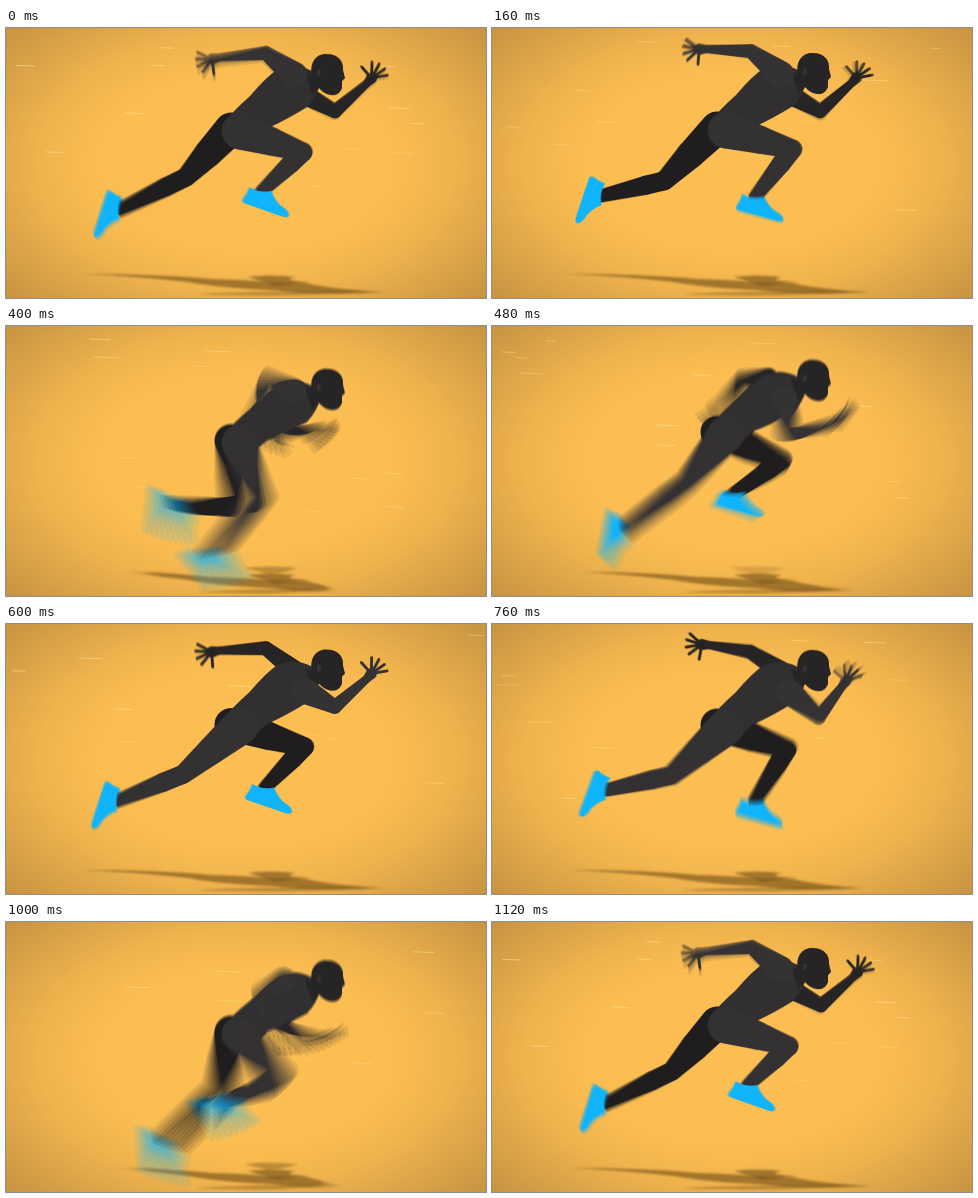
These frames come from a looping animation (480 by 270 pixels, 1.16 s). An HTML page with a canvas:

```html
<!DOCTYPE html>
<html lang="en">
<head>
<meta charset="utf-8">
<title>Sprinter</title>
<style>
  html, body { margin: 0; width: 100%; height: 100%; overflow: hidden; background: #e4aa4a; }
  canvas { display: block; width: 480px; height: 270px; }
</style>
</head>
<body>
<canvas id="stage" width="480" height="270"></canvas>
<script>
const W = 480, H = 270, STEP = 40, STEPS = 29, STRIDE = 28, SAMPLES = 10, SHUTTER = 0.85;
const TAU = Math.PI * 2, RAD = Math.PI / 180;
const COLOR = {
  torso: '#312f30', nearLeg: '#343132', nearArm: '#353233',
  farLeg: '#1f1d1e', farArm: '#262425', head: '#262425', shoe: '#10b4fc'
};

// time, knee x y, ankle x y, shoe angle
const LEG = [
  [0, 297, 124, 256, 163, 18], [4, 301, 121, 263, 169, 14], [5, 295, 125, 262, 178, 14],
  [8, 288, 156, 264, 214, 14], [9, 276, 163, 243, 218, 16], [12, 194, 156, 131, 205, 97],
  [14, 180, 149, 113, 182, 106], [18, 172, 153, 109, 168, 107], [19, 180, 151, 114, 166, 109],
  [22, 195, 172, 128, 167, 104], [23, 204, 178, 139, 167, 104], [26, 290, 135, 242, 167, 14]
];
// time, elbow x y, wrist x y, hand angle, finger spread
const ARM = [
  [0, 260, 25, 213, 30, 166, 1], [4, 259, 23, 214, 21, 178, 1], [5, 258, 28, 217, 21, 185, 1],
  [8, 263, 31, 222, 32, 140, .7], [9, 267, 40, 232, 60, 130, .6], [12, 297, 109, 338, 99, -28, .35],
  [14, 329, 83, 361, 55, -48, 1], [18, 328, 83, 360, 55, -48, 1], [19, 327, 93, 350, 62, -55, 1],
  [22, 320, 105, 350, 82, -46, .8], [23, 294, 119, 322, 98, -22, .35], [26, 250, 55, 230, 86, 120, .4]
];
const SHOULDER = [
  [0, 289, 47], [4, 289, 46], [8, 288, 56], [9, 287, 61], [12, 292, 72], [14, 299, 67],
  [18, 299, 67], [19, 297, 68], [22, 301, 82], [23, 293, 82], [26, 276, 52]
];
// time, head drop, hip drop
const BOB = [[0, 0, 0], [4, -1, -1], [5, 0, 0], [8, 11, 13], [9, 19, 16], [12, 8, 5]];

// Periodic monotone cubic through the keys, all channels at once.
function sample(keys, period, time) {
  const t = ((time % period) + period) % period, n = keys.length;
  let i = n - 1;
  while (keys[i][0] > t) i--;
  const key = k => keys[((k % n) + n) % n];
  const at = k => key(k)[0] + Math.floor(k / n) * period;
  const span = at(i + 1) - at(i), u = (t - at(i)) / span;
  return key(i).slice(1).map((_, c) => {
    const slope = k => (key(k + 1)[c + 1] - key(k)[c + 1]) / (at(k + 1) - at(k));
    const tangent = k => {
      const a = slope(k - 1), b = slope(k);
      return a * b <= 0 ? 0 : 2 * a * b / (a + b);
    };
    const p = key(i)[c + 1], q = key(i + 1)[c + 1];
    return p + (q - p) * u * u * (3 - 2 * u)
      + span * u * (1 - u) * ((1 - u) * tangent(i) - u * tangent(i + 1));
  });
}

const bobAt = t => sample(BOB, STRIDE / 2, t);
const hipAt = t => [229, 102 + bobAt(t)[1]];
const shoulderAt = t => sample(SHOULDER, STRIDE, t);
const mix = (a, b, k) => [a[0] + (b[0] - a[0]) * k, a[1] + (b[1] - a[1]) * k];
const polar = (p, angle, len) => [p[0] + Math.cos(angle) * len, p[1] + Math.sin(angle) * len];

function toPolar(a, b) {
  let angle = Math.atan2(b[1] - a[1], b[0] - a[0]);
  if (angle < -Math.PI / 2) angle += TAU;
  return [angle, Math.hypot(b[0] - a[0], b[1] - a[1])];
}
const toJoints = (keys, rootAt) => keys.map(([t, x1, y1, x2, y2, ...rest]) =>
  [t, ...toPolar(rootAt(t), [x1, y1]), ...toPolar([x1, y1], [x2, y2]), ...rest]);
const legJoints = toJoints(LEG, hipAt), armJoints = toJoints(ARM, shoulderAt);

function chain(keys, rootAt, t) {
  const [a1, l1, a2, l2, angle, spread] = sample(keys, STRIDE, t);
  const root = rootAt(t), mid = polar(root, a1, l1);
  return { root, mid, end: polar(mid, a2, l2), angle: angle * RAD, spread };
}
const legAt = t => chain(legJoints, hipAt, t);
const armAt = t => chain(armJoints, shoulderAt, t);

const makeCanvas = () => Object.assign(document.createElement('canvas'), { width: W, height: H });
const screen = document.getElementById('stage').getContext('2d');
const backdrop = makeCanvas().getContext('2d');
const g = makeCanvas().getContext('2d');

function limb(a, b, ra, rb) {
  const dir = Math.atan2(b[1] - a[1], b[0] - a[0]);
  const d = Math.hypot(b[0] - a[0], b[1] - a[1]) || 1;
  const off = Math.acos(Math.max(-1, Math.min(1, (ra - rb) / d)));
  g.beginPath();
  g.arc(a[0], a[1], ra, dir + off, dir - off + TAU);
  g.arc(b[0], b[1], rb, dir - off, dir + off);
  g.fill();
}

function fillPath(d, x = 0, y = 0, angle = 0) {
  g.save();
  g.translate(x, y);
  g.rotate(angle);
  g.fill(new Path2D(d));
  g.restore();
}

function drawLeg(leg, hip, hipRadius, color) {
  const thigh = mix(hip, leg.mid, .5), calf = mix(leg.mid, leg.end, .3);
  g.fillStyle = color;
  limb(hip, thigh, hipRadius, 14);
  limb(thigh, leg.mid, 14, 9.5);
  limb(leg.mid, calf, 9.5, 9.5);
  limb(calf, leg.end, 9.5, 6.5);
  g.fillStyle = COLOR.shoe;
  fillPath('M-13 0Q-13 7-16 14Q-16 17-12 17L27 18Q34 18 33 14Q31 10 22 8Q14 4 9-3Q-2 3-13 0Z',
    ...leg.end, leg.angle);
}

function drawArm(arm, shoulderRadius, color) {
  g.fillStyle = g.strokeStyle = color;
  limb(arm.root, arm.mid, shoulderRadius, 7);
  limb(arm.mid, arm.end, 7, 4);
  const palm = polar(arm.end, arm.angle, 7);
  limb(arm.end, palm, 4, 5.5);
  g.lineCap = 'round';
  g.lineWidth = 2.8;
  [-84, -41, -14, 13, 38].forEach((fan, i) => {
    const tip = polar(palm, arm.angle + fan * RAD * arm.spread, i ? 16 : 15);
    g.beginPath();
    g.moveTo(...palm);
    g.lineTo(...tip);
    g.stroke();
  });
}

function drawTorso(top, low) {
  const y = (v, drop) => v + drop;
  g.fillStyle = COLOR.torso;
  g.beginPath();
  g.moveTo(217, y(96, low));
  g.quadraticCurveTo(226, y(84, low), 244, y(68, (top + low) / 2));
  g.quadraticCurveTo(260, y(49, top), 272, y(41, top));
  g.quadraticCurveTo(288, y(34, top), 306, y(43, top));
  g.lineTo(314, y(55, top));
  g.quadraticCurveTo(312, y(67, top), 301, y(79, top));
  g.quadraticCurveTo(280, y(92, (top + low) / 2), 262, y(100, low));
  g.lineTo(240, y(119, low));
  g.closePath();
  g.fill();
}

function drawRunner(t) {
  const [top, low] = bobAt(t), half = STRIDE / 2;
  drawArm(armAt(t + half), 10, COLOR.farArm);
  drawLeg(legAt(t + half), [225, 101 + low], 16.5, COLOR.farLeg);
  drawTorso(top, low);
  g.fillStyle = COLOR.head;
  fillPath('M306 48C303 34 311 25 321 26C332 26 338 33 337 42L339 50L336 53L336 60Q333 68 325 67Q318 66 313 60L306 66L299 44Z', 0, top);
  g.fillStyle = '#373435';
  fillPath('M311 42q4-3 4 2q-1 5-4 4Z', 0, top);
  drawLeg(legAt(t), [234, 103 + low], 18.5, COLOR.nearLeg);
  drawArm(armAt(t), 13, COLOR.nearArm);
}

function drawShadow(t) {
  const legs = [legAt(t), legAt(t + STRIDE / 2)], arms = [armAt(t), armAt(t + STRIDE / 2)];
  const left = Math.min(...legs.map(l => l.end[0])) - 36;
  const right = Math.max(...arms.map(a => a.end[0])) + 19;
  const low = Math.max(...legs.map(l => l.end[1]));
  g.save();
  g.filter = 'blur(1.2px)';
  g.fillStyle = 'rgba(125, 88, 28, .68)';
  fillPath(`M${left} 246Q150 246 205 251Q240 252 262 254L300 255Q330 262 ${right} 264Q310 268 264 262Q215 260 182 254Q130 248 ${left} 246Z`);
  fillPath('M242 249Q262 246 290 249Q272 253 305 254L270 258Z');
  g.fillStyle = 'rgba(125, 88, 28, .45)';
  fillPath(`M190 266Q245 263 ${right - 20} 263Q290 270 190 266Z`);
  if (low > 200) {
    g.globalAlpha = Math.min(1, (low - 200) / 12);
    fillPath('M238 242Q262 239 292 242Q275 248 262 248Z');
  }
  g.restore();
}

function drawStreaks(index) {
  let seed = index * 7919 + 1013;
  const random = () => (seed = (seed * 16807) % 2147483647) / 2147483647;
  random();
  g.lineWidth = 1;
  for (let i = 0; i < 12; i++) {
    const x = random() * W, y = 10 + random() * 175, len = 10 + random() * 14;
    g.strokeStyle = `rgba(255, 226, 150, ${.25 + random() * .35})`;
    g.beginPath();
    g.moveTo(x, y);
    g.lineTo(x + len, y + .6);
    g.stroke();
  }
}

function paintBackdrop() {
  const glow = backdrop.createRadialGradient(0, 0, 0, 0, 0, 1);
  [[0, '#fdbf54'], [.45, '#fbbd52'], [.62, '#f0b34d'], [.78, '#dda548'], [1, '#c39140']]
    .forEach(stop => glow.addColorStop(...stop));
  backdrop.translate(W / 2, H / 2);
  backdrop.scale(335, 205);
  backdrop.fillStyle = glow;
  backdrop.fillRect(-1, -1, 2, 2);
}

// Averages several moments of one step to get motion blur.
function render(index) {
  const phase = index % STRIDE;
  for (let i = 0; i < SAMPLES; i++) {
    const t = phase + ((i + .5) / SAMPLES - .5) * SHUTTER;
    g.drawImage(backdrop.canvas, 0, 0);
    drawStreaks(phase);
    drawShadow(t);
    drawRunner(t);
    screen.globalAlpha = 1 / (i + 1);
    screen.drawImage(g.canvas, 0, 0);
  }
}

let shown = -1;
const start = performance.now();
function tick() {
  const index = Math.floor((performance.now() - start) / STEP) % STEPS;
  if (index !== shown) render(shown = index);
  requestAnimationFrame(tick);
}
paintBackdrop();
tick();
</script>
</body>
</html>
```
